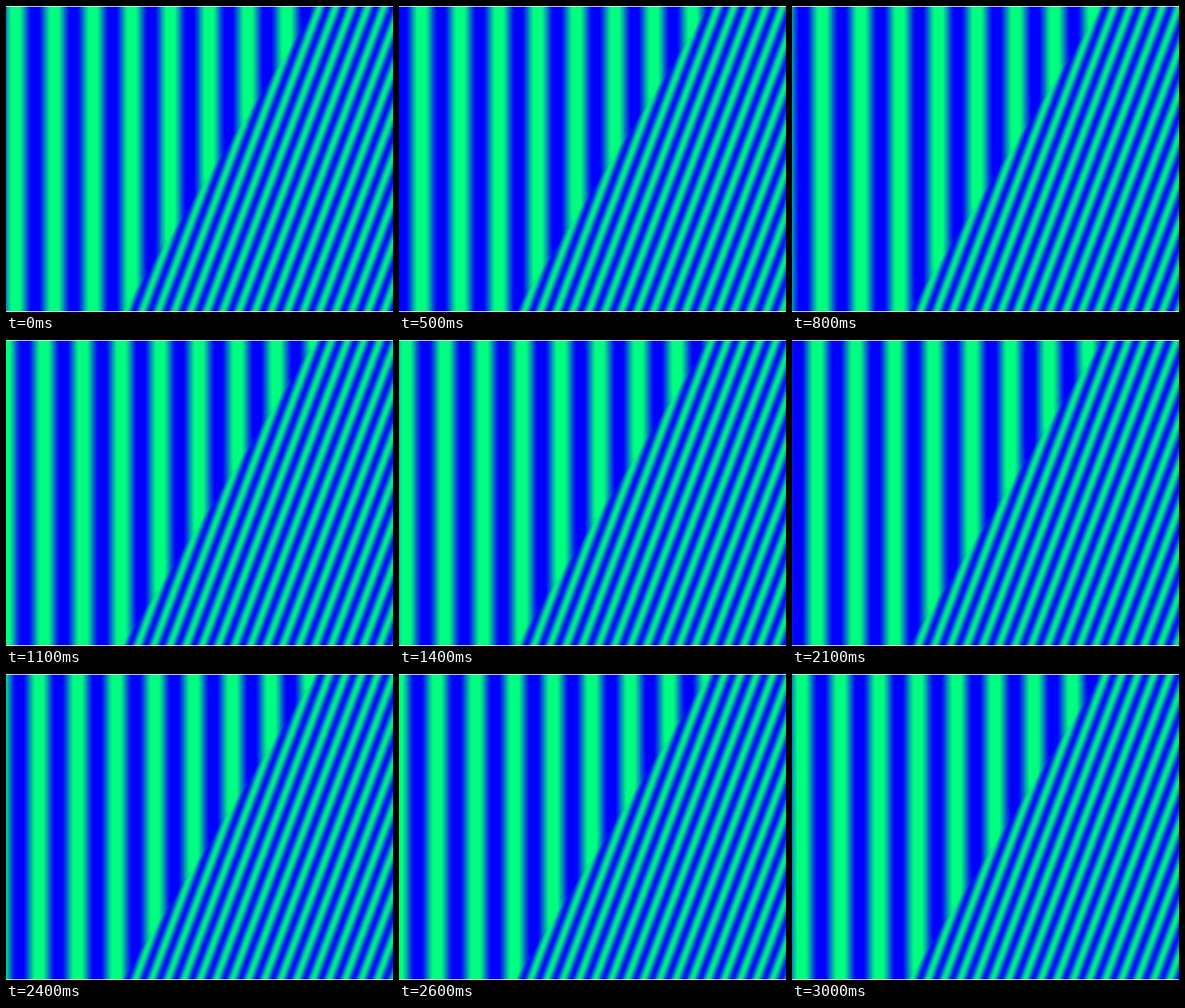
An HTML page with a canvas for the animation above (3.1 s loop, 522 by 413 pixels).

```html
<!DOCTYPE html>
<html lang="en">
<head>
<meta charset="utf-8">
<title>Wave refraction</title>
<style>
  html, body { margin: 0; width: 100%; height: 100%; overflow: hidden; background: #fff; }
  canvas { display: block; }
</style>
</head>
<body>
<canvas id="stage" width="522" height="413"></canvas>
<script>
const W = 522, H = 411, TOP = 1, UNITS = 10;   // the plot spans 10 x 10 wavelengths
const STEP_MS = 100, STEPS = 31;
const INDEX = 2.5;                             // refractive index of the right medium
const LEFT_GAIN = 1.25, RIGHT_GAIN = 0.87;

// Interface: x = 8 - y / 2. Snell's law gives the bend of the wave behind it.
const incidence = Math.atan(0.5);
const bend = incidence - Math.asin(Math.sin(incidence) / INDEX);
const extraCycles = INDEX * Math.cos(bend) - 1;

const ctx = document.getElementById('stage').getContext('2d');
const image = ctx.createImageData(W, H);
const clamp = (v, lo, hi) => Math.max(lo, Math.min(hi, v));
let shown = -1;

function setPixel(i, wave) {
  const level = (clamp(wave, -1, 1) + 1) / 2;
  image.data[i + 1] = 255 * level;
  image.data[i + 2] = 255 - 127.5 * level;
  image.data[i + 3] = 255;
}

function draw(step) {
  const shift = 2 * step / (STEPS - 1);
  for (let row = 0, i = 0; row < H; row++) {
    const edge = 8 - UNITS * (row + 0.5) / H / 2;
    for (let col = 0; col < W; col++, i += 4) {
      const x = UNITS * (col + 0.5) / W;
      const depth = x - edge;
      const cycles = x + Math.max(0, depth) * extraCycles - shift;
      const mix = clamp(depth * 10 + 0.5, 0, 1);
      const gain = LEFT_GAIN + (RIGHT_GAIN - LEFT_GAIN) * mix;
      setPixel(i, gain * Math.sin(2 * Math.PI * cycles));
    }
  }
  ctx.putImageData(image, 0, TOP);
}

function tick() {
  const step = Math.floor(performance.now() / STEP_MS) % STEPS;
  if (step !== shown) draw(shown = step);
  requestAnimationFrame(tick);
}
tick();
</script>
</body>
</html>
```
